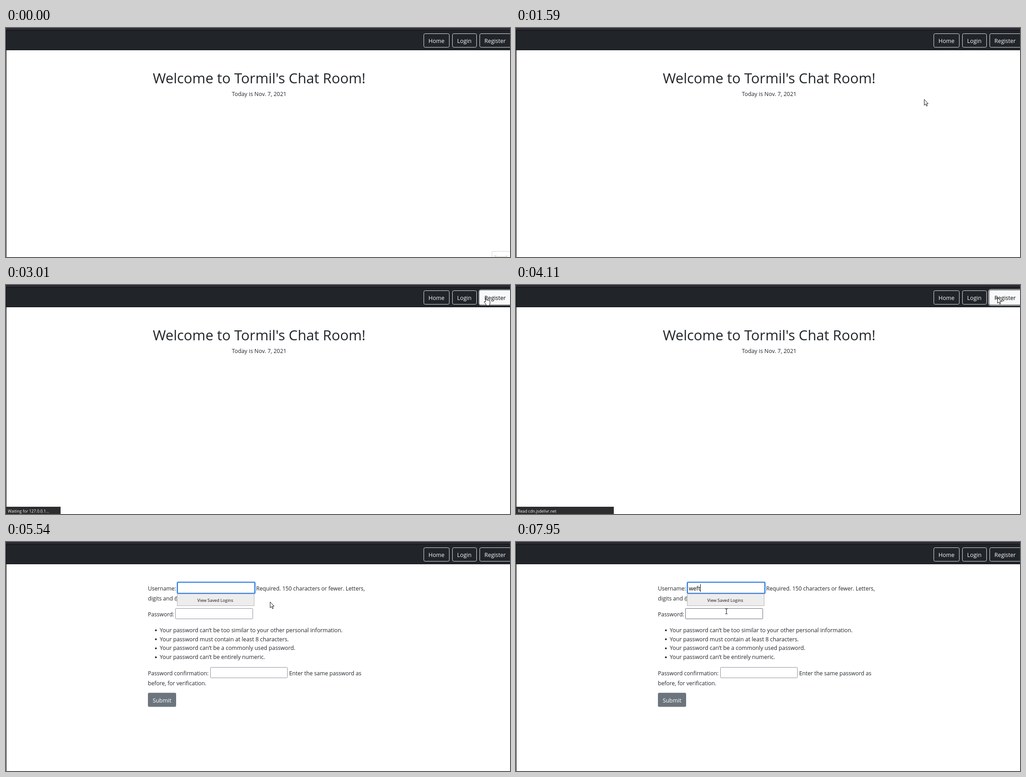
An HTML page for the animation above (8 s loop, 1108 by 505 pixels).

```html
<!DOCTYPE html>
<html lang="en">
<head>
<meta charset="utf-8">
<title>Chat room sign-up</title>
<style>
  html, body { margin: 0; width: 100%; height: 100%; overflow: hidden; background: #fff; }
  svg { display: block; width: 1108px; height: 505px; font-family: "Open Sans", "Noto Sans", sans-serif; }
  text { white-space: pre; }
</style>
</head>
<body>
<svg id="stage" viewBox="0 0 1108 505"></svg>
<script>
const LOOP = 8000, INK = '#212529', PALE = '#f8f9fa';

const rect = (x, y, w, h, attrs = '') => `<rect x="${x}" y="${y}" width="${w}" height="${h}" ${attrs}/>`;
const label = (x, y, size, str, attrs = '') =>
  `<text x="${x}" y="${y}" font-size="${size}" ${attrs}>${str}</text>`;
const centred = (x, y, size, str, attrs = '') => label(x, y, size, str, `text-anchor="middle" ${attrs}`);
const field = (x, y, w, h, attrs = '') => rect(x, y, w, h, `rx="1" fill="#fff" stroke="#8f8f9d" ${attrs}`);
const navButton = (x, w, str, id = '') =>
  rect(x, 12.5, w, 30, `rx="3" fill="none" stroke="${PALE}" stroke-width=".9"`) +
  (id && rect(x - .5, 12, w + 1, 31, `id="${id}Fill" rx="3" fill="${PALE}"`)) +
  label(x + 10.3, 33.3, 12.4, str, `fill="${PALE}" ${id && `id="${id}Text"`}`);

const rules = [
  'Your password can’t be too similar to your other personal information.',
  'Your password must contain at least 8 characters.',
  'Your password can’t be a commonly used password.',
  'Your password can’t be entirely numeric.'
].map((str, i) => {
  const y = 194.3 + i * 19.8;
  return `<circle cx="329.5" cy="${y + .5}" r="2"/>` + label(338, y + 4.4, 12.28, str);
}).join('');

document.getElementById('stage').innerHTML = `
  ${rect(0, 0, 1108, 505, 'fill="#fff"')}
  ${rect(0, 0, 1108, 5, 'fill="#2b2a33"')}
  ${rect(0, 5, 1108, 44, 'fill="#0c0c0d"')}
  ${rect(0, 6, 1108, 42, `fill="${INK}"`)}
  ${rect(0, 5, 1, 500, 'fill="#0c0c0d"')}
  ${navButton(918.5, 56, 'Home')}
  ${navButton(981.5, 53, 'Login')}
  ${rect(1041, 12, 75, 31, 'id="ring" rx="3" fill="none" stroke="#8d8f92"')}
  ${navButton(1041.5, 74, 'Register', 'reg')}

  <g id="welcome" fill="${INK}">
    ${centred(556.5, 122, 31.05, "Welcome to Tormil's Chat Room!")}
    ${centred(556.5, 149.6, 12.4, 'Today is Nov. 7, 2021')}
  </g>

  <g id="form" fill="${INK}">
    ${label(312, 106.6, 12.1, 'Username:')}
    ${label(550, 106.6, 12.1, 'Required. 150 characters or fewer. Letters,')}
    ${label(312, 128.6, 12.1, 'digits and @/./+/-/_ only.')}
    ${rect(375.5, 87.5, 173, 27, 'rx="3" fill="none" stroke="#0060df" stroke-opacity=".25" stroke-width="2"')}
    ${rect(377, 89, 170, 24, 'rx="1.5" fill="#fff" stroke="#0060df" stroke-width="1.7"')}
    ${label(380, 106.6, 12.3, '', 'id="typed" fill="#000"')}
    ${rect(380, 93, 1, 17, 'id="caret" fill="#000"')}
    ${label(312, 163.6, 12.1, 'Password:')}
    ${field(372.5, 146.5, 170, 23, 'id="password"')}
    ${rules}
    ${label(312, 293.6, 12.1, 'Password confirmation:')}
    ${field(449.5, 276.5, 169, 23)}
    ${label(622.5, 293.6, 12.1, 'Enter the same password as')}
    ${label(312, 315.6, 12.1, 'before, for verification.')}
    ${rect(312, 332.5, 62, 31, 'rx="3" fill="#6c757d"')}
    ${centred(343, 353.8, 12.4, 'Submit', 'fill="#fff"')}
    <g id="menu">
      ${rect(376.5, 114.5, 169, 26, 'id="menuFill" stroke="#b4b4b6"')}
      ${centred(460, 131.6, 9.3, 'View Saved Logins', 'fill="#15141a"')}
    </g>
  </g>

  <g id="status">
    ${rect(0, 489, 215, 16, 'id="statusFill" fill="#2d2d2f"')}
    ${label(4, 501.7, 8.75, '', 'id="statusText" fill="#fbfbfe"')}
  </g>

  <g id="record">
    ${rect(1068.5, 492.5, 45, 20, 'fill="#fff" stroke="#cbd6da"')}
    ${label(1073, 507.5, 9, 'Record', 'fill="#c9baa9"')}
  </g>

  <g id="cursor" stroke-linejoin="round">
    <path id="arrow" d="M.5 .5V13.3L3.4 10.6L5.4 15.3L7.4 14.4L5.4 9.9H9.2Z" fill="#fff" stroke="#111"/>
    <path id="hand" d="M-3.6 10V1Q-2.3 -1 -1 1V6.5q1.3 -1 2.4 .5q1.3 -.7 2.4 .6q1.9 -.4 2.2 1.5V13q0 2 -1.4 4V18.3H-2V17Q-4 14 -6.6 10.6Q-6.5 8.4 -4.9 9.2Z" fill="#fff" stroke="#111"/>
    <path id="beam" d="M-2.5 -5.5H-.5L0 -5L.5 -5.5H2.5M0 -5V5M-2.5 5.5H-.5L0 5L.5 5.5H2.5" fill="none" stroke="#111"/>
  </g>`;

// Moments of the story, in ms.
const ENTER = 720, HOVER = 2390, LINK = 2650, CLICK = 2910, TRANSFER = 3580,
  READ = 4110, BLANK = 4250, FORM = 5370, MENU = 5520, CARET = 5880, TYPE = 6740;
const NAME = 'weft', KEY = 130, BLINK = 530, SAMPLE = 75;

// Pointer moves: start, end, and where the move stops.
const moves = [
  [ENTER, 960, 918, 392], [1190, 1330, 865, 211], [1590, 1590, 897, 157], [1680, 1820, 967, 106],
  [2020, 2510, 1058, 27], [4400, 4630, 865, 103], [4910, 5110, 656, 140],
  [5440, 5670, 555, 129], [5860, 6000, 491, 116], [7530, 7950, 462.5, 153]
];

const clamp = v => Math.min(1, Math.max(0, v));
const easeOut = p => 1 - (1 - p) ** 2;

function pointerAt(t) {
  let x = 1100, y = 505;
  for (const [start, end, toX, toY] of moves) {
    if (t < start) break;
    const steps = Math.round((end - start) / SAMPLE);
    const done = steps ? Math.floor(clamp((t - start) / (end - start)) * steps + 1e-6) : 0;
    const p = easeOut((done + 1) / (steps + 1));
    x += (toX - x) * p;
    y += (toY - y) * p;
  }
  return { x, y };
}

function statusAt(t) {
  if (t < LINK || t >= FORM) return '';
  if (t < CLICK) return '127.0.0.1:8000/register/';
  if (t < TRANSFER) return 'Waiting for 127.0.0.1…';
  return t < READ ? 'Transferring data from cdn.jsdelivr.net…' : 'Read cdn.jsdelivr.net';
}

const el = {};
document.querySelectorAll('[id]').forEach(node => el[node.id] = node);
const show = (node, on) => node.style.display = on ? '' : 'none';
const set = (node, attrs) => { for (const k in attrs) node.setAttribute(k, attrs[k]); };

function draw(t) {
  const { x, y } = pointerAt(t);
  const inside = (left, top, right, bottom) => x > left && x < right && y > top && y < bottom;
  const onRegister = inside(1041, 12, 1108, 43), onPassword = inside(372, 146, 543, 170);

  const shape = onPassword ? 'beam' : onRegister && t < READ ? 'hand' : 'arrow';
  set(el.cursor, { transform: `translate(${x} ${y})` });
  for (const name of ['arrow', 'hand', 'beam']) show(el[name], t >= ENTER && name === shape);

  const hover = onRegister ? easeOut(clamp((t - HOVER) / 180)) : 0;
  const tone = Math.round(248 * (1 - hover));
  set(el.regFill, { opacity: hover });
  set(el.regText, { fill: `rgb(${tone},${tone},${tone})` });
  set(el.ring, { 'stroke-width': t < BLANK ? 6.5 * clamp((t - CLICK) / 150) : 0 });
  set(el.record, { opacity: t < 70 ? 1 : t < 160 ? .4 : 0 });
  show(el.welcome, t < BLANK);
  show(el.form, t >= FORM);
  show(el.menu, t >= MENU);

  const message = statusAt(t);
  show(el.status, message);
  el.statusText.textContent = message;
  set(el.statusFill, { width: t < TRANSFER ? 120 : 215 });

  const typed = NAME.slice(0, Math.max(0, Math.floor((t - TYPE) / KEY) + 1));
  el.typed.textContent = typed;
  show(el.caret, Math.floor((t - (t < TYPE ? CARET : TYPE)) / BLINK) % 2 === 0);
  set(el.caret, { x: 380 + (typed && Math.round(el.typed.getComputedTextLength())) });
  set(el.menuFill, { fill: inside(376, 113, 546, 141) ? '#e3e2e4' : '#ededee' });
  set(el.password, { stroke: onPassword ? '#676774' : '#8f8f9d' });
}

const start = performance.now();
function tick() {
  draw((performance.now() - start) % LOOP);
  requestAnimationFrame(tick);
}
tick();
</script>
</body>
</html>
```
